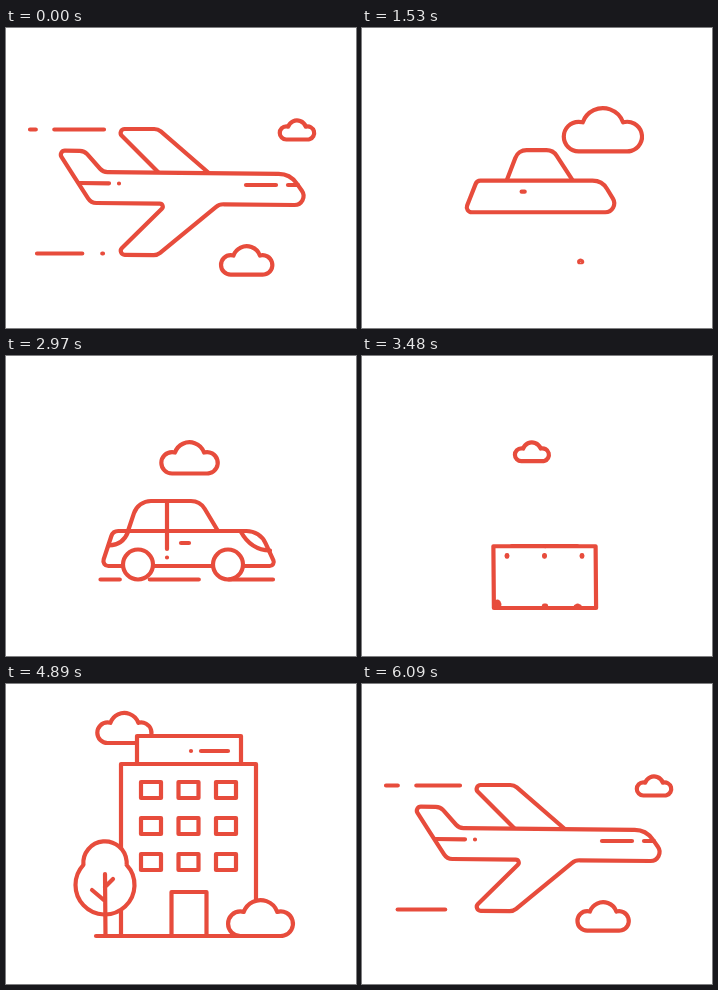
An HTML page with a canvas for the animation above (6.12 s loop, 350x300 px).

```html
<!DOCTYPE html>
<html lang="en">
<head>
<meta charset="utf-8">
<title>Plane, car, building</title>
<style>
html, body { margin: 0; width: 100%; height: 100%; overflow: hidden; background: #fff; }
canvas { display: block; }
</style>
</head>
<body>
<canvas id="stage" width="350" height="300"></canvas>
<script>
const ctx = document.getElementById('stage').getContext('2d');
const LOOP = 6120, PI = Math.PI, RED = '#e74c3c';

const clamp = u => Math.max(0, Math.min(1, u));
const easeIn = u => u * u;
const easeOut = u => 1 - (1 - u) ** 2;
const mix = (a, b, u) => Array.isArray(a) ? a.map((v, i) => mix(v, b[i], u)) : a + (b - a) * u;

// 0 to 1 over in0..in1, back to 0 over out0..out1.
const pulse = (t, in0, in1, out0, out1) =>
  easeOut(clamp((t - in0) / (in1 - in0))) * (1 - easeIn(clamp((t - out0) / (out1 - out0))));

// Each morph eases into a halfway pose, out of it, then holds.
const TIMES = [0, 1220, 1530, 1740, 3110, 3480, 3780, 4960, 5250, 5560, LOOP];
const ORDER = ['plane', 'plane', 'lowCar', 'car', 'car', 'block', 'tower', 'tower', 'hull', 'plane', 'plane'];

function morph(poses, t) {
  const i = TIMES.findLastIndex(v => v <= t);
  const u = (t - TIMES[i]) / (TIMES[i + 1] - TIMES[i]);
  return mix(poses[ORDER[i]], poses[ORDER[i + 1]], (i % 3 === 1 ? easeIn : easeOut)(u));
}

// x of the corners clockwise from top left, [top, bottom], corner radii, size of wing and tail
const body = {
  plane: [[65, 284, 306, 85], [144, 175], [4, 22, 9, 10], 1],
  lowCar: [[115, 240, 259, 102.5], [152.5, 184], [5, 17, 9, 5], 0],
  car: [[107, 254, 270, 95.5], [175, 210], [9, 21, 4, 5], 0],
  block: [[131.5, 233.5, 234, 132], [191, 252], [0, 0, 0, 0], 0],
  tower: [[115, 250, 250, 115], [80, 252], [0, 0, 0, 0], 0],
  hull: [[80, 262, 262, 90], [143.5, 174], [4, 16, 16, 26], 0]
};

// The same for the upper wing, cabin and roof, with the top radii only
const roof = {
  plane: [[109, 152, 204, 154], [101, 146], [4, 10]],
  lowCar: [[156.5, 191, 210.5, 145], [122, 152], [12, 12]],
  car: [[132, 194, 212, 122], [145, 175], [18, 16]],
  block: [[150, 215, 215, 150], [191, 191], [0, 0]],
  tower: [[131, 235, 235, 131], [52, 80], [0, 0]],
  hull: [[152, 200, 200, 152], [144, 144], [0, 0]]
};

// Offset from a steady drift, bottom, scale
const cloud = {
  plane: [0, 111.5, .61], lowCar: [4.3, 123.5, 1.39], car: [-2, 117.5, 1],
  block: [2.5, 105.5, .6], tower: [1, 59, .96], hull: [10, 111.5, 0]
};

// Ends and height of the short bar: cabin windows, door handle, roof sign
const bar = {
  plane: [240, 270, 157], lowCar: [159.5, 162.5, 163.5], car: [175, 183, 187],
  block: [183, 183, 191], tower: [195, 222, 67], hull: [178, 214, 160]
};

// Scales the path about a pivot, keeping the line weight.
function shape(path, { x = 0, y = 0, s = 1, fill = false } = {}) {
  if (s < .01) return;
  ctx.beginPath();
  ctx.save();
  ctx.translate(x, y);
  ctx.scale(s, s);
  path();
  ctx.restore();
  ctx.fillStyle = s < .1 ? RED : '#fff';
  if (fill) ctx.fill();
  ctx.stroke();
}

// Grows about a point while the path keeps stage coordinates.
const about = (x, y, k) => ({ x: x * (1 - k), y: y * (1 - k), s: k });

const line = (x1, y1, x2, y2) => { ctx.moveTo(x1, y1); ctx.lineTo(x2, y2); };
const dot = (x, y) => line(x, y, x + .01, y);

// Rounded corner at b, radius limited by the neighbouring edges.
function corner(a, b, c) {
  const v = [a[0] - b[0], a[1] - b[1]], w = [c[0] - b[0], c[1] - b[1]];
  const lv = Math.hypot(...v), lw = Math.hypot(...w);
  if (lv < .1 || lw < .1) return ctx.lineTo(b[0], b[1]);
  const cos = (v[0] * w[0] + v[1] * w[1]) / (lv * lw);
  const half = Math.acos(Math.max(-1, Math.min(1, cos))) / 2;
  ctx.arcTo(b[0], b[1], c[0], c[1], Math.min(b[2], Math.min(lv, lw) / 2 * Math.tan(half)));
}

function bodyPath([[tl, tr, br, bl], [top, bottom], [a, b, c, d], k]) {
  const w = br - bl;
  const p = [
    [tl - 13.5 * k, top - 21 * k, a], [tl + .06 * w, top - 21 * k, 10], [tl + .145 * w, top, 10],
    [tr, top, b], [br, bottom, c],
    [bl + .58 * w, bottom, 12], [bl + .3 * w, bottom + 51.5 * k, 10],
    [bl + .109 * w, bottom + 51.5 * k, 4], [bl + .344 * w, bottom, 3],
    [bl, bottom, d]
  ].map(([x, y, r]) => [x, y + .01 * k * (x - 90), r]);
  const n = p.length;
  ctx.moveTo((p[n - 1][0] + p[0][0]) / 2, (p[n - 1][1] + p[0][1]) / 2);
  p.forEach((q, i) => corner(p[(i + n - 1) % n], q, p[(i + 1) % n]));
  ctx.closePath();
}

function roofPath([[tl, tr, br, bl], [top, bottom], [a, b]]) {
  const p = [[bl, bottom], [tl, top, a], [tr, top, b], [br, bottom]];
  ctx.moveTo(bl, bottom);
  corner(p[0], p[1], p[2]);
  corner(p[1], p[2], p[3]);
  ctx.lineTo(br, bottom);
}

function cloudPath() {
  ctx.arc(-17.5, -10.7, 10.7, PI / 2, -PI / 2 + .28);
  ctx.arc(0, -15.8, 15.44, PI + .343, -.343);
  ctx.arc(17.5, -10.7, 10.7, -PI / 2 - .28, PI / 2);
  ctx.closePath();
}

// Dashes running left from x1 to x0; start is the offset of one dash from x1.
function streak(x0, x1, y, dash, gap, start, size) {
  if (size < .01 || x1 - x0 < .1) return;
  const mid = (x0 + x1) / 2;
  ctx.save();
  ctx.lineWidth *= Math.min(1, size * 4);
  ctx.setLineDash([dash, gap]);
  ctx.lineDashOffset = -start;
  shape(() => line(mix(mid, x1, size), y, mix(mid, x0, size), y));
  ctx.restore();
}

function drawPlane(p) {
  const k = pulse(p, -820, -520, 1220, 1400);
  shape(() => { line(73, 155, 103, 155.3); dot(113, 155.5); }, about(73, 155, k));
  shape(() => line(282, 157, 292, 157), about(287, 157, k));

  const out = clamp((p + 873) / 423), size = 1 - easeIn(clamp((p - 1290) / 235));
  streak(98 - 74 * out, 98, 101.5, 54, 18.5, -4.5 + .2 * p, size);
  streak(97 - 66 * out, 97, 225.5, 47.5, 20, 20.5 + .23 * p, size);
}

function drawCar(t) {
  const k = pulse(t, 1560, 1850, 3110, 3340);
  shape(() => { line(161, 147, 161, 193); dot(161, 201.5); }, about(161, 175, k));
  shape(() => { ctx.moveTo(103, 189.5); ctx.quadraticCurveTo(117, 189, 122, 176); }, about(110, 182, k));
  shape(() => { ctx.moveTo(235, 176); ctx.quadraticCurveTo(245, 194, 264, 194.5); }, about(250, 185, k));
  for (const x of [132, 222]) {
    shape(() => ctx.arc(0, 0, 15, 0, 2 * PI), { x, y: 208.5, s: k, fill: true });
  }
  streak(94.5, 267, 223.5, 49, 30, 27 + .2 * (t - 2340), k);
}

function crownPath() {
  ctx.arc(0, -51, 29.5, -.75, PI + .75);
  ctx.arc(0, -73, 21.7, PI - .088, .088);
  ctx.closePath();
}

function trunkPath() {
  line(.5, 0, 0, -62);
  line(-13, -46, 0, -35);
  line(8, -57, 0, -49);
}

function drawBuilding(t) {
  const open = pulse(t, 3478, 3800, 4960, 5160);
  for (let row = 0; row < 3; row++) for (let col = 0; col < 3; col++) {
    const y = mix(201, 106 + 36 * row, open);
    shape(() => ctx.rect(-10, -8, 20, 16), { x: 145 + 37.5 * col, y, s: open });
  }
  shape(() => ctx.rect(-17.5, -44, 35, 44), { x: 183, y: 252, s: pulse(t, 3472, 3800, 4960, 5160) });
  shape(() => dot(185, 67), about(185, 67, pulse(t, 3740, 3800, 4960, 5000)));

  const k = pulse(t, 3462, 4020, 4950, 5160);
  if (k < .01) return;
  shape(() => line(mix(138, 90, k), 252, mix(213, 275, k), 252));
  const tree = { x: mix(138, 99, k), y: 252, s: k };
  shape(crownPath, { ...tree, fill: true });
  shape(trunkPath, tree);
  shape(cloudPath, { x: mix(213, 254.5, k), y: 252, s: 1.15 * k, fill: true });
}

function draw(t) {
  const p = t < 5250 ? t : t - LOOP;   // time relative to the held plane
  const q = t < 3000 ? t : t - LOOP;
  ctx.fillStyle = '#fff';
  ctx.fillRect(0, 0, 350, 300);
  ctx.strokeStyle = RED;
  ctx.lineWidth = 4.2;
  ctx.lineCap = ctx.lineJoin = 'round';

  const [dx, y, s] = morph(cloud, t);
  shape(cloudPath, { x: 291 + dx - .0355 * p, y, s, fill: true });
  const low = .91 * pulse(q, -1025, -715, 1230, 1540);
  shape(cloudPath, { x: 240.7 - .0144 * q, y: 233.5 + 14.5 * low, s: low, fill: true });

  shape(() => roofPath(morph(roof, t)), { fill: true });
  shape(() => bodyPath(morph(body, t)), { fill: true });
  const [x1, x2, barY] = morph(bar, t);
  shape(() => line(x1, barY, x2, barY));
  drawPlane(q);
  drawCar(t);
  drawBuilding(t);
}

const begin = performance.now();
function frame() {
  draw((performance.now() - begin) % LOOP);
  requestAnimationFrame(frame);
}
frame();
</script>
</body>
</html>
```
